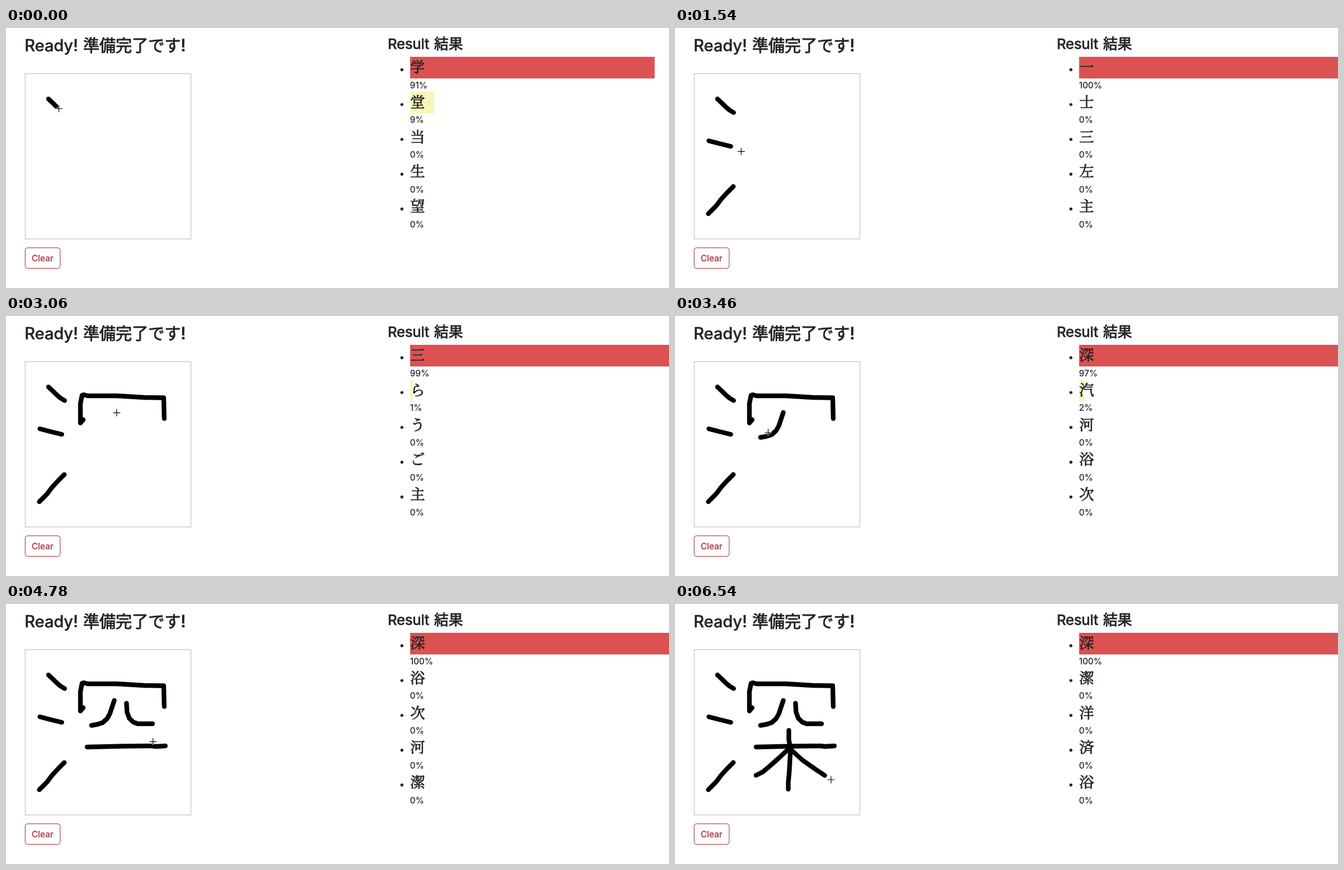
An HTML page that plays this animation: 1194 px wide and 469 px high, repeating every 6560 ms.

```html
<!DOCTYPE html>
<html lang="ja">
<head>
<meta charset="utf-8">
<title>Handwriting recognition</title>
<style>
  html, body { margin: 0; width: 100%; height: 100%; overflow: hidden; background: #fff; }
  svg { display: block; width: 100%; height: 100%; }
  text { font-family: Inter, "Noto Sans CJK JP", "Noto Sans CJK", sans-serif; fill: #212529; white-space: pre; }
  .title { font-size: 29.3px; font-weight: 500; letter-spacing: -.1px; }
  .subtitle { font-size: 26px; font-weight: 500; letter-spacing: -.4px; }
  .title, .subtitle { stroke: #212529; stroke-width: .4; }
  .title tspan, .subtitle tspan { stroke-width: .9; letter-spacing: 0; }
  .small { font-size: 15.4px; font-weight: 500; }
  .glyph { font-family: "Noto Serif CJK JP", "Noto Sans CJK JP", "Noto Sans CJK", serif; font-size: 26.5px; stroke: #212529; stroke-width: .8; }
  .ink { fill: none; stroke: #000; stroke-width: 8.4; stroke-linecap: round; stroke-linejoin: round; }
</style>
</head>
<body>
<svg viewBox="0 0 1194 469">
  <text class="title" x="33.5" y="41.5">Ready!<tspan x="139">準備完了です!</tspan></text>
  <rect x="34.5" y="82.5" width="298.5" height="298" fill="#fff" stroke="#b4b4c0"/>
  <rect x="34.5" y="396.5" width="63" height="37" rx="4" fill="#fff" stroke="#a3282f"/>
  <text class="small" x="46.3" y="421" style="fill:#a3282f">Clear</text>
  <text class="subtitle" x="687.5" y="38">Result<tspan x="771">結果</tspan></text>
  <g id="rows"></g>
  <g id="strokes"></g>
  <g id="cursor" fill="none">
    <path d="M-6.5 0H6.5M0-6.5V6.5" stroke="#fff" stroke-width="2.8" stroke-opacity=".8"/>
    <path d="M-6.5 0H6.5M0-6.5V6.5" stroke="#000" stroke-width="1.2"/>
  </g>
</svg>
<script>
const LOOP = 6560, FRAME = 20, INK_LAG = 30;
const ROW_STEP = 62.8, FULL_BAR = 484;
const BAR_COLORS = ['#dd5151', '#f6f6b9', '#96c8b1', '#79b8bb', 'none'];

// [pen down, pen up, path]
const STROKES = [
  [-134, 66, 'M76.5 128L85 136L91 142L98 148L105.5 152.5'],
  [420, 600, 'M61 203.5L80 208.5L100.5 213.5'],
  [1015, 1260, 'M60 335L74 321L83 309L94 297L105 286'],
  [1866, 2081, 'M137 143L134 158L134 193L139 187'],
  [2260, 2800, 'M140 142L147 144L200 144L250 147L284 147.5L285 185'],
  [3100, 3340, 'M195 174L187 198L182 207L174 214L165 217L154 219'],
  [3737, 3985, 'M217 179L218 195L222 206L229 213L237 216L264 216'],
  [4250, 4660, 'M146 258L210 256.5L262 256L270 257L287 256'],
  [5010, 5270, 'M205 228L205 245L208 261L206 300L204 322L204 334'],
  [5480, 5760, 'M206 260L188 277L170 293L158 303L146 309'],
  [6344, 6540, 'M209 263L230 282L250 296L281 317']
];

// [time shown, guesses, percentages]
const RESULTS = [
  [0, '学堂当生望', [91, 9, 0, 0, 0]],
  [200, 'っつざ一ぎ', [1, 1, 1, 1, 1]],
  [1400, '一士三左主', [100, 0, 0, 0, 0]],
  [2920, '三らうご主', [99, 1, 0, 0, 0]],
  [3460, '深汽河浴次', [97, 2, 0, 0, 0]],
  [4120, '深浴次河潔', [100, 0, 0, 0, 0]],
  [5380, '深潔洋済浴', [100, 0, 0, 0, 0]]
];

function add(parent, tag, attrs) {
  const node = document.createElementNS('http://www.w3.org/2000/svg', tag);
  for (const key in attrs) node.setAttribute(key, attrs[key]);
  return parent.appendChild(node);
}

const byId = id => document.getElementById(id);
const clamp = v => Math.min(1, Math.max(0, v));
const smooth = v => v * v * (3 - 2 * v);

const rows = BAR_COLORS.map((fill, i) => {
  const row = add(byId('rows'), 'g', { transform: `translate(0 ${i * ROW_STEP})` });
  add(row, 'circle', { cx: 713, cy: 75.3, r: 2.7, fill: '#212529' });
  return {
    bar: add(row, 'rect', { x: 727.7, y: 52, height: 39, fill }),
    glyph: add(row, 'text', { class: 'glyph', x: 728, y: 80 }),
    percent: add(row, 'text', { class: 'small', x: 727.5, y: 108.6 })
  };
});

const strokes = STROKES.map(([start, end, d]) => {
  const path = add(byId('strokes'), 'path', { class: 'ink', d });
  const length = path.getTotalLength();
  const lengthAt = t => length * clamp((t - start) / (end - start));
  return { start, end, path, length, lengthAt, pointAt: t => path.getPointAtLength(lengthAt(t)) };
});

function penAt(t) {
  const next = strokes.findIndex(s => t < s.start);
  const last = strokes[next < 0 ? strokes.length - 1 : next - 1];
  const from = last.pointAt(t);
  if (t <= last.end || next < 0) return from;
  const target = strokes[next];
  const to = target.pointAt(target.start);
  const k = smooth((t - last.end) / (target.start - last.end));
  return { x: from.x + (to.x - from.x) * k, y: from.y + (to.y - from.y) * k };
}

let shown;
function showResult(result) {
  if (result === shown) return;
  shown = result;
  const [, glyphs, percents] = result;
  rows.forEach((row, i) => {
    row.bar.setAttribute('width', percents[i] / 100 * FULL_BAR);
    row.glyph.textContent = glyphs[i];
    row.percent.textContent = percents[i] + '%';
  });
}

function draw(t) {
  for (const s of strokes) {
    const inked = t - INK_LAG;
    s.path.style.display = inked >= s.start ? '' : 'none';
    s.path.style.strokeDasharray = inked >= s.end ? 'none' : `${s.lengthAt(inked)} ${s.length + 20}`;
  }
  const pen = penAt(t);
  byId('cursor').setAttribute('transform', `translate(${pen.x} ${pen.y})`);
  showResult(RESULTS.filter(r => r[0] <= t).pop());
}

const began = performance.now();
function tick() {
  const t = (performance.now() - began) % LOOP;
  draw(Math.floor(t / FRAME) * FRAME);
  requestAnimationFrame(tick);
}
tick();
</script>
</body>
</html>
```
